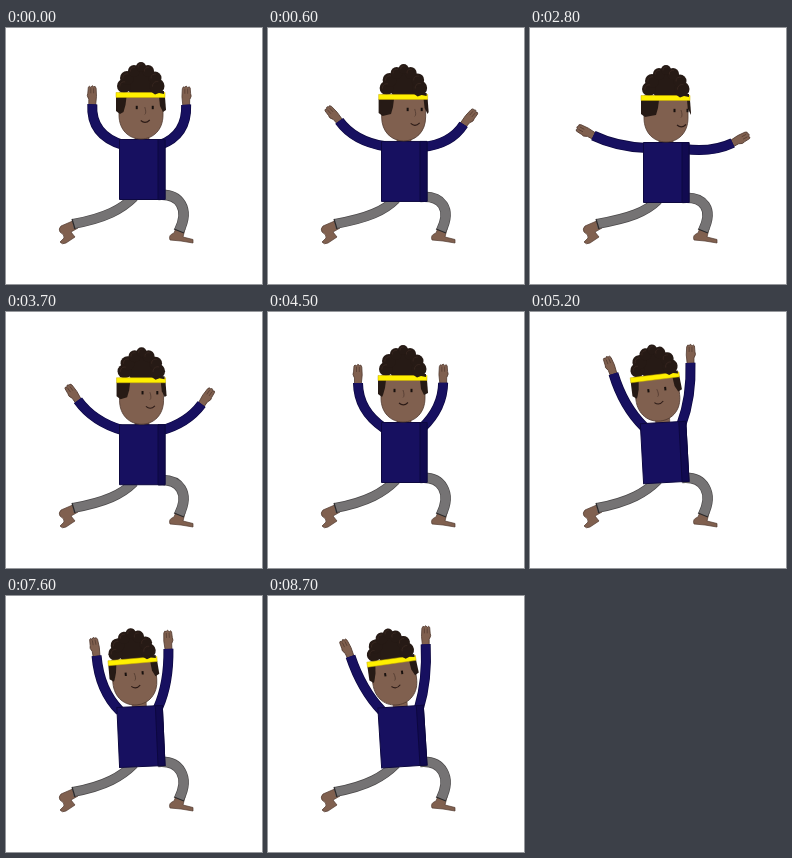
Recreate the animation shown at these times as an HTML page with a canvas. Size 256 by 256 pixels, loop 8.8 s.

```html
<!DOCTYPE html>
<html>
<head>
<meta charset="utf-8">
<title>Warrior stretch</title>
<style>
  html, body { margin: 0; height: 100%; overflow: hidden; background: #fff; }
  canvas { display: block; width: 100vw; height: 100vh; }
</style>
</head>
<body>
<canvas></canvas>
<script>
const canvas = document.querySelector('canvas');
const ctx = canvas.getContext('2d');
const LOOP = 8800, STEP = 100;
const NAVY = '#171060', NAVY_DARK = '#0d0840', SKIN = '#80604f', SKIN_DARK = '#513a30';
const GREY = '#757374', GREY_DARK = '#4c4a4b', HAIR = '#261a15', YELLOW = '#fff000';

// body: torso drop, lean, head x, head y, head tilt, head turn
// arm: shoulder x, y, elbow angle, length, wrist angle, length, hand angle (outward from up)
const raised = {
  body: [0, 0, 135, 89, 0, .25],
  left: [117, 117, 73, 34, 37, 51, 0],
  right: [154, 117, 70, 29, 33, 48, 0]
};
const open = {
  body: [3, 0, 136, 92, 0, 1],
  left: [117, 119, 85, 30, 74, 53, 64],
  right: [154, 120, 93, 29, 77, 47, 62]
};
const wide = {
  body: [3, 0, 136, 92, 0, 1],
  left: [117, 120, 88, 30, 77, 55, 62],
  right: [154, 121, 98, 28, 83, 49, 62]
};
const overhead = {
  body: [-1, 0, 135, 88, 0, 0],
  left: [116, 116, 56, 31, 30, 52, 0],
  right: [154, 116, 46, 29, 25, 50, 0]
};
const leaning = {
  body: [-1, -3.6, 127, 87, -8, 0],
  left: [114, 115, 44, 29, 30, 63, 25],
  right: [151, 112, 17, 29, 6, 64, 0]
};
const easingBack = {
  body: [-1, -2.6, 129, 87, -5, 0],
  left: [114, 115, 45, 29, 23, 60, 10],
  right: [152, 112, 24, 27, 10, 60, -3]
};
const keys = [
  [0, raised], [1000, open], [1400, open], [2800, wide], [3100, wide],
  [4400, overhead], [4500, overhead], [5400, leaning], [6700, leaning],
  [7600, easingBack], [8500, leaning], [LOOP, leaning]
];

function mix(a, b, k) {
  const pose = {};
  for (const part in a) pose[part] = a[part].map((v, i) => v + (b[part][i] - v) * k);
  return pose;
}

function poseAt(t) {
  const i = keys.findIndex(key => key[0] > t);
  const [t0, a] = keys[i - 1], [t1, b] = keys[i];
  const k = (t - t0) / (t1 - t0);
  return mix(a, b, k * k * (3 - 2 * k));
}

const rad = deg => deg * Math.PI / 180;

function placed(x, y, deg, draw) {
  ctx.save();
  ctx.translate(x, y);
  ctx.rotate(rad(deg));
  draw();
  ctx.restore();
}

function shape(path, fill, stroke, width = 1) {
  const p = new Path2D(path);
  if (fill) { ctx.fillStyle = fill; ctx.fill(p); }
  if (stroke) { ctx.strokeStyle = stroke; ctx.lineWidth = width; ctx.stroke(p); }
}

function tube(path, width, fill, edge) {
  shape(path, null, edge, width);
  shape(path, null, fill, width - 1.4);
}

function disc(x, y, r, fill) {
  ctx.fillStyle = fill;
  ctx.beginPath();
  ctx.arc(x, y, r, 0, 7);
  ctx.fill();
}

function hand() {
  shape('M-3.5 2 L-3.5 -5 Q-6 -9 -4.5 -11 L-4 -17 Q-3 -19 -1.7 -17 Q0 -20 1.3 -17.5 Q3 -19 3.8 -16 L4.2 -8 L3.2 2 Z',
    SKIN, SKIN_DARK, .8);
  shape('M-1.5 -11 V-16 M1.3 -11 V-16', null, SKIN_DARK, .7);
}

function arm([x, y, elbow, upper, reach, length, tilt], side) {
  const point = (deg, r) => [x + side * r * Math.sin(rad(deg)), y - r * Math.cos(rad(deg))];
  const wrist = point(reach, length);
  placed(...wrist, side * tilt, () => { ctx.scale(-side, 1); hand(); });
  tube(`M${x} ${y} Q${point(elbow, upper)} ${wrist}`, 10, NAVY, NAVY_DARK);
}

function legs(drop) {
  shape('M69 192 L55 198 Q52 201 54 204 Q59 207 58 210 L54 214 Q56 217 60 215 L69 209 L65 204 L72 200 Z',
    SKIN, SKIN_DARK, .7);
  shape('M170 200 L168 205 Q162 207 164 212 L175 213 L187 215 V211.5 L177 209 L179 201 Z',
    SKIN, SKIN_DARK, .7);
  tube(`M128 ${169 + drop} C116 ${181 + drop} 100 190 67 196`, 10, GREY, GREY_DARK);
  tube(`M152 ${167 + drop} C174 ${165 + drop} 184 181 173 203`, 10.5, GREY, GREY_DARK);
  shape('M66 191 L69 201 M168 201 L178 205', null, '#2c2a2b', 1.2);
}

function torso(drop, lean) {
  placed(136, 170 + drop, lean, () => {
    shape('M-7 -63 H7 V-58 H-7 Z', SKIN, SKIN_DARK, .6);
    shape('M-22.5 -58.5 H23 V1.5 H-22.5 Z', NAVY, NAVY_DARK);
    shape('M16 -58.5 H23 V1.5 H16 Z', '#110a50', NAVY_DARK);
  });
}

function head(x, y, tilt, turn) {
  placed(x, y, tilt, () => {
    shape('M-22 -24 H22 V-2 C22 13 12 22 0 22 S-22 13 -22 -2 Z', SKIN, SKIN_DARK, .8);

    const leftEdge = -18 + 10 * turn, rightEdge = 18 + 4 * turn;
    shape(`M-25 -20 H${leftEdge + 1} L${leftEdge} -12 L${leftEdge - 2} -5 L-21 -3 L-25 -6 Z`, HAIR);
    shape(`M${rightEdge - 1} -20 H24 L25 -7 L${rightEdge + 3} -5 L${rightEdge} -11 Z`, HAIR);

    const curls = [[0, -36, 16], [-17, -31, 7], [16, -31, 7.5], [-14, -39, 7], [14, -39, 6.5],
      [-7, -46, 6], [7, -46, 6], [0, -50, 5]];
    for (const curl of curls) disc(...curl, HAIR);
    for (const [cx, cy, r] of curls.slice(1)) {
      ctx.strokeStyle = '#3d2a23';
      ctx.lineWidth = .7;
      ctx.beginPath();
      ctx.arc(cx, cy, r * .6, 3, 5);
      ctx.stroke();
    }
    shape('M-25 -24.5 H24 V-19.5 H-25 Z', YELLOW, '#c7ad00', .5);
    shape('M9 -26 H23 V-23 L18 -24 L14 -22.5 Z', HAIR);

    const shift = 15 * turn, gap = 8.5 - 2 * turn;
    const eyeY = -9.5, mouthY = 3 + 2 * turn;
    for (const side of [-1, 1]) {
      shape(`M${shift + side * gap} ${eyeY - 1.7} v3.4`, null, '#17100e', 2);
    }
    shape(`M${shift} -10 q2 6 0 7.5`, null, SKIN_DARK, .8);
    shape(`M${shift - 4} ${mouthY} q4.5 4 9 -.5`, null, '#2c1b17', 1.1);
  });
}

function frame(now) {
  const scale = devicePixelRatio;
  canvas.width = innerWidth * scale;
  canvas.height = innerHeight * scale;
  ctx.scale(canvas.width / 256, canvas.height / 256);
  ctx.fillStyle = '#fff';
  ctx.fillRect(0, 0, 256, 256);

  const time = Math.floor(now % LOOP / STEP) * STEP;
  const { body: [drop, lean, ...headPose], left, right } = poseAt(time);
  legs(drop);
  arm(left, -1);
  arm(right, 1);
  torso(drop, lean);
  head(...headPose);
  requestAnimationFrame(frame);
}
requestAnimationFrame(frame);
</script>
</body>
</html>
```
